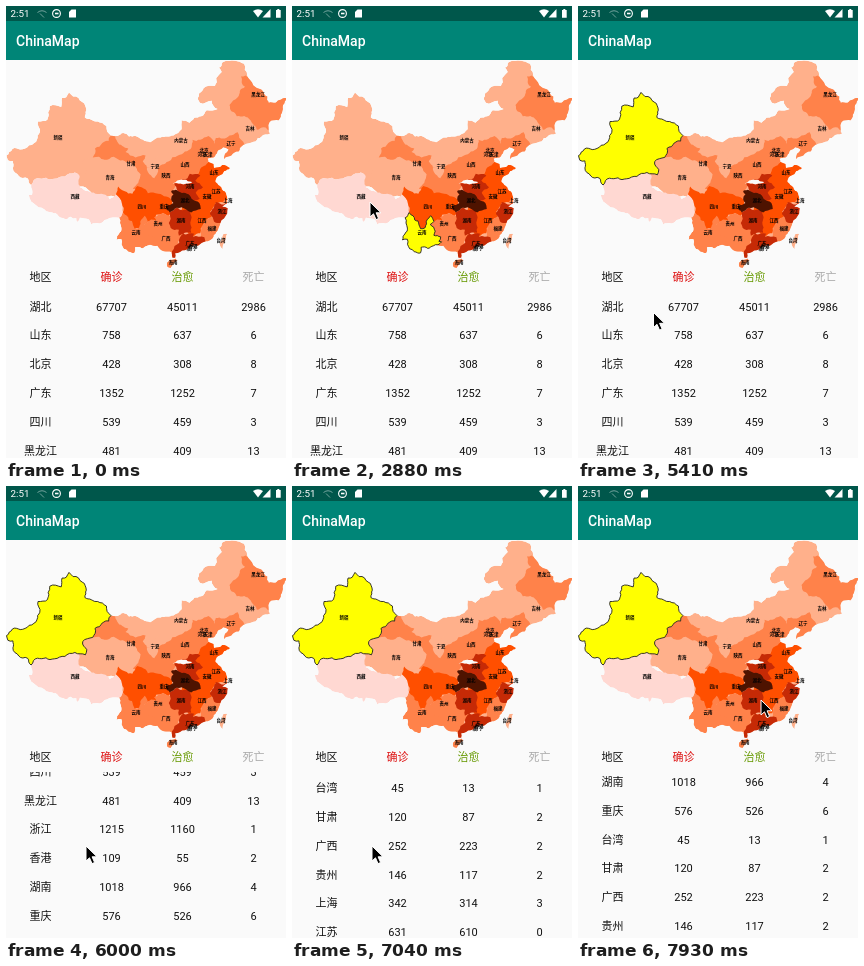
Animation, 280 px wide and 452 px high, one loop 8 s. Source, as an HTML page:

```html
<!DOCTYPE html>
<html lang="zh-CN">
<head>
<meta charset="utf-8">
<title>ChinaMap</title>
<style>
html, body { margin: 0; width: 100%; height: 100%; overflow: hidden; background: #fafafa; }
svg { display: block; width: 280px; height: 452px; }
text { font-family: Roboto, "Noto Sans CJK SC", "Noto Sans CJK", sans-serif; }
#head, #rows { font-size: 11px; text-anchor: middle; fill: #111; }
#names { font-size: 18px; font-weight: 700; text-anchor: middle; }
</style>
</head>
<body>
<svg viewBox="0 0 280 452">
  <defs>
    <clipPath id="list"><path d="M0 286H280V452H0Z"/></clipPath>
    <clipPath id="coast"></clipPath>
  </defs>
  <rect width="280" height="452" fill="#fafafa"/>
  <g id="land" clip-path="url(#coast)"></g>
  <path id="picked" fill="#ff0" stroke="#222" stroke-width=".9" stroke-linejoin="round"/>
  <g id="names"></g>
  <rect width="280" height="54" fill="#008577"/>
  <rect width="280" height="15" fill="#00574b"/>
  <text x="4.5" y="11" font-size="9.8" fill="#fff">2:51</text>
  <g fill="none" stroke="#fff">
    <path d="M31.5 6.5Q36 3 40.5 6.5M34 7.5L38 11.5" opacity=".45"/>
    <circle cx="50.5" cy="7.5" r="3.9" stroke-width="1.1"/>
    <path d="M49 7.5H52.5" stroke-width="1.6"/>
  </g>
  <g fill="#fff">
    <path d="M65.5 3.5H70V11.5H63V6Z"/>
    <path d="M247 5Q252 1.5 257 5L252 11.5Z"/>
    <path d="M264.5 3V11.5H256.5Z"/>
    <path d="M270 4H271.3V3H273.3V4H274.7V11.8H270Z"/>
  </g>
  <text x="10" y="40" font-size="14" font-weight="500" fill="#fff">ChinaMap</text>
  <g id="head"></g>
  <g clip-path="url(#list)"><g id="rows"></g></g>
  <path id="cursor" d="M0 0V15L3.5 11.8 6 17.6 8.6 16.5 6.1 10.8H11Z" stroke="#fff"/>
</svg>
<script>
const $ = id => document.getElementById(id);
const add = (parent, tag, attrs, text = "") => {
  const el = document.createElementNS("http://www.w3.org/2000/svg", tag);
  for (const k in attrs) el.setAttribute(k, attrs[k]);
  el.textContent = text;
  return parent.appendChild(el);
};

// Mercator projection of longitude / latitude onto the stage
const project = (lon, lat) => {
  const m = Math.log(Math.tan(Math.PI / 4 + lat * Math.PI / 360)) * 180 / Math.PI;
  return [(lon - 73.5) * 4.56 + .5, 262 - (m - 18.5) * 4.6];
};

// Splits an edge with small seeded offsets, equal in both directions
function rough(a, b) {
  const dx = b[0] - a[0], dy = b[1] - a[1];
  if (Math.hypot(dx, dy) < 3.2) return [b];
  const h = Math.sin((a[0] + b[0]) * 12.9 + (a[1] + b[1]) * 78.2) * 437.5;
  const k = (h - Math.floor(h) - .5) * .32 * (a[0] < b[0] ? 1 : -1);
  const mid = [(a[0] + b[0]) / 2 - dy * k, (a[1] + b[1]) / 2 + dx * k];
  return [...rough(a, mid), ...rough(mid, b)];
}

function outline(coords) {
  const n = coords.split(" ").map(Number), pts = [];
  for (let i = 0; i < n.length; i += 2) pts.push(project(n[i], n[i + 1]));
  const all = pts.flatMap((p, i) => rough(p, pts[(i + 1) % pts.length]));
  return "M" + all.map(p => p.map(v => v.toFixed(1)).join(" ")).join("L") + "Z";
}

const paint = (fill, coords) => {
  const d = outline(coords);
  add($("land"), "path", { d, fill });
  return d;
};
// Areas that also shape the outer border
const ground = (fill, coords) => {
  const d = paint(fill, coords);
  add($("coast"), "path", { d });
  return d;
};

const pale = "#ffd8d2", light = "#ffb08b", mid = "#ff824a",
  strong = "#ff4f00", dark = "#c62a06", darkest = "#4e1300";

// North, south, Taiwan
ground(light, "88.8 36 90 38.6 92 40 95 42.3 96.4 42.7 101.8 42.6 105 41.6 107.3 42.4 110.1 42.7 111.9 43.7 111.9 45.1 113.6 44.7 116.2 45.7 117.4 46.6 119.8 46.8 118.5 48 115.9 47.7 115.5 48.2 116.7 49.8 119.2 50.1 120.7 52 120.1 52.6 120.9 53.3 123.6 53.5 125.6 53.1 127.6 50.2 130.7 48.6 131 47.7 132.5 47.7 135.1 48.4 133.9 46.2 133.2 45.1 131.2 44.8 131.3 43 129.4 42.5 126.5 41.4 124.4 40.1 121.2 38.8 122.2 40.4 121 40.8 118.9 39.1 117.6 38.9 117.8 38.3 118.9 38 119 37.3 120.8 37.8 122.5 37.3 120.2 36 119.3 35 105 33 97.5 32 93 32 89 34");
ground(light, "97.5 32.8 102 35 119.2 35.1 120.3 34.1 121.9 31.8 121.9 31 120.8 30.3 122 30 121.9 29 120.4 27.2 119.5 25.4 117.2 23.6 115.5 22.7 113.6 22.5 112.6 21.8 110.5 21.2 110.5 20.3 109.9 20.3 109.7 21.4 108 21.6 106.6 22.7 105 23 101 25 99 28.5");
ground(light, "121 25 121.9 25.1 121.4 23.4 120.9 22 120.2 23");

// Xinjiang, Tibet
const xinjiang = ground(light, "73.5 39.4 74.8 40.5 76.5 40.4 80.2 42.1 80.8 43.2 80.4 44.9 82.5 45.2 83 47.2 85.5 47.1 85.7 48.4 86.6 48.5 87.2 49.2 88.1 48.6 90.1 47.8 91 46.6 90.7 45.5 93.5 44.9 95.4 44.2 96.4 42.7 95.9 41.8 94.5 41.5 92.9 40.6 92.4 39.1 90.2 38.4 91.1 37 90.8 36.1 88.5 36.5 84 35.4 80.3 35.5 78.9 34.3 78.1 35.5 76.2 35.9 74.9 37.3 74.9 38.5 73.8 38.6");
ground(pale, "78.9 34.3 80.3 35.5 84 35.4 88.5 36.5 89.4 36.1 89.6 33.9 93 32.7 96.1 31.7 97.5 32.6 98.8 30.9 99.1 29.2 98.2 28.2 95.5 27.9 93.8 27.1 92.1 26.9 91.6 27.9 89.6 28.2 89 27.4 88.8 28.1 86.2 28 83.5 29.2 81.2 30.1 78.9 31.3 78.4 32.5 79.1 32.5");

// Gansu to Liaoning, Ningxia, Heilongjiang
paint(mid, "92.4 39.1 92.9 40.6 94.5 41.5 95.9 41.8 96.4 42.7 97.2 42.8 97.8 41.7 100.2 40.6 99.6 40 101.8 39.1 104 39.4 103.4 38.4 104.3 37.4 107.6 37.9 109 38.4 111.1 39.4 114.1 40.8 114.3 42 116 42 117.8 42.6 119.2 41.3 119.4 42.3 122.4 42.7 124.2 43.2 125.4 41.7 126 40.8 125 38.5 118 38.6 116 37 114.9 36 110.5 34 109.6 31.7 105 32 103.2 33.9 101.2 33.6 102.4 34.7 102.9 36.2 101.8 37.5 99 38.6 97 39.2 95 38.7");
paint(light, "104.3 37.4 105.8 37.8 105.9 38.8 106.8 39.4 106.8 38.3 107.6 37.9 106.5 36.2 105.9 35.5 105.2 36");
paint(mid, "124.9 51.4 126.9 51.3 136 50 136 46 131.3 43.4 129.9 44 128.4 43.6 127 45.1 124 45.7 122.4 47.4 124.2 48.5 125.8 50 125.1 50.5");

// Shandong to Jiangxi, Sichuan with Chongqing
paint(strong, "115.5 36.2 116.2 37.4 117.8 38.4 123 38.4 123 36 122.2 31.6 119.4 31 118.2 29.4 118.5 28.3 116.7 27 116 25.2 114.4 24.5 112 26 112 30 114 34");
paint(strong, "97.5 32.6 98 34 101.1 32.7 102.2 34.1 103.2 33.9 104.5 32.8 106.8 32.7 108.5 32.2 110 31.5 109.1 28.6 107.8 29.1 106.3 28.8 106.3 27.8 104.5 27.5 103 26.5 101.2 26 99 29.2 98.8 30.9");

// Guizhou with Guangxi, Fujian, Shanghai
paint(mid, "103.7 26.9 105.2 27.9 106.3 27.8 105.8 28.3 107.8 29.1 109.1 28.6 111 27 112.2 25.1 111.9 24.1 110 21 106 21 104.5 23 104 25");
paint(mid, "118.5 28.3 121 27 118 22 116 24 116.2 25.9 116.7 27");
paint(mid, "121.3 31.6 122.2 31.4 122 30.7 120.9 31");

// Henan, Hunan, Guangdong, Zhejiang, Hubei
paint(dark, "110.3 34.6 113.2 35.5 113.7 36.3 116 36 114.9 35.1 116.6 33.9 115.6 33.5 115 32.9 115.9 31.8 114.1 31.5 112 32 111 33.3");
paint(dark, "109.3 29.2 110.8 30.1 113.6 29.8 114.1 28.3 113.8 27.3 114 25.3 111.3 24.7 111.3 25.9 109.5 26.2 109.1 27.2 109.5 28");
paint(dark, "112.2 25.1 114.7 25.1 114.4 24.5 116.9 24.4 117.3 23.3 113 20 109.7 20 109.8 21.6 111.4 23.3");
paint(dark, "119.4 31.2 121.2 30.7 123 31 123 28 120.4 27.2 119 27.5 118.1 28.9 118.9 30");
paint(darkest, "109.6 31.7 110.1 32.6 109.6 33.2 111 33.3 113.7 32.4 114.1 31.8 115.8 31 116.1 29.9 114 29.2 112.9 29.8 110.8 30.1 109.3 29.2 108.5 30.4 110.1 31");

// Yunnan, Hainan
const yunnan = ground(mid, "98.2 28.2 99.1 29.2 99.9 28.6 100.3 27.8 101 27.6 101.6 26.1 102.6 26.3 103 27.8 103.8 28.6 104.5 27.5 103.7 26.9 104.8 25.6 104.5 24.8 106 24.5 105.6 23.6 106.2 23.5 104.4 22.7 101.7 22.4 101.6 21.3 100.2 21.5 99.2 22.1 98.7 24 97.6 23.9 98.7 26.2");
ground(mid, "108.7 19.3 109.3 19.9 110.6 20.1 111 19.6 109.5 18.2 108.7 18.5");

const label = text => text.split(",").forEach(s => {
  const [name, x, y] = s.split(" ");
  add($("names"), "text", { transform: `translate(${x} ${y}) scale(.25)` }, name);
});
label("新疆 52 133,西藏 69 192,青海 104 173,甘肃 125 159,宁夏 149 162,内蒙古 175 136,黑龙江 252 90,吉林 244 124,辽宁 225 139");
label("北京 198 146,天津 202 150,河北 196 150,山西 179 160,陕西 160 171,山东 208 168,河南 184 182,江苏 210 187,安徽 201 192,上海 222 196,浙江 216 207");
label("湖北 179 196,重庆 158 202,四川 136 202,贵州 152 219,湖南 175 216,江西 196 216,福建 206 224,台湾 215 236");
label("云南 130 228,广西 160 234,广东 184 239,香港 187 242,澳门 185 244,海南 167 258");

// Table
const line = (parent, cells, y, fills = []) => cells.forEach((c, i) =>
  add(parent, "text", { x: 34.5 + 71 * i, y, ...(fills[i] && { fill: fills[i] }) }, c));
line($("head"), ["地区", "确诊", "治愈", "死亡"], 274.5, [, "#d11", "#690", "#aaa"]);
`湖北 67707 45011 2986
山东 758 637 6
北京 428 308 8
广东 1352 1252 7
四川 539 459 3
黑龙江 481 409 13
浙江 1215 1160 1
香港 109 55 2
湖南 1018 966 4
重庆 576 526 6
台湾 45 13 1
甘肃 120 87 2
广西 252 223 2
贵州 146 117 2
上海 342 314 3
江苏 631 610 0
陕西 245 226 1
江西 935 918 1`.split("\n").forEach((r, i) => line($("rows"), r.split(" "), 304.5 + 28.8 * i));

// Moves: start time, number of hard steps, target values
const loop = 8000, tick = 146;
const pointer = [
  [500, 1, 99, 373], [650, 1, 110, 334], [940, 4, 125, 236], [2580, 3, 78, 196],
  [3780, 2, 90, 303], [4070, 4, 62, 146], [5110, 4, 80, 360], [7780, 2, 183, 214]
];
const scroll = [
  [5850, 2, 130], [6150, 4, 205.5], [6740, 5, 340], [7490, 1, 345], [7780, 1, 144], [7930, 1, 235]
];
function follow(moves, start, t) {
  let pos = start;
  for (const [from, count, ...to] of moves) {
    if (t < from) break;
    const k = Math.min(1, (Math.floor((t - from) / tick) + 1) / count);
    pos = pos.map((p, i) => p + (to[i] - p) * k);
  }
  return pos;
}

function draw() {
  const t = performance.now() % loop;
  $("cursor").setAttribute("transform", `translate(${follow(pointer, [-50, -50], t)})`);
  $("rows").setAttribute("transform", `translate(0 ${-follow(scroll, [0], t)[0]})`);
  $("picked").setAttribute("d", t < 1680 ? "" : t < 4670 ? yunnan : xinjiang);
  requestAnimationFrame(draw);
}
draw();
</script>
</body>
</html>
```
